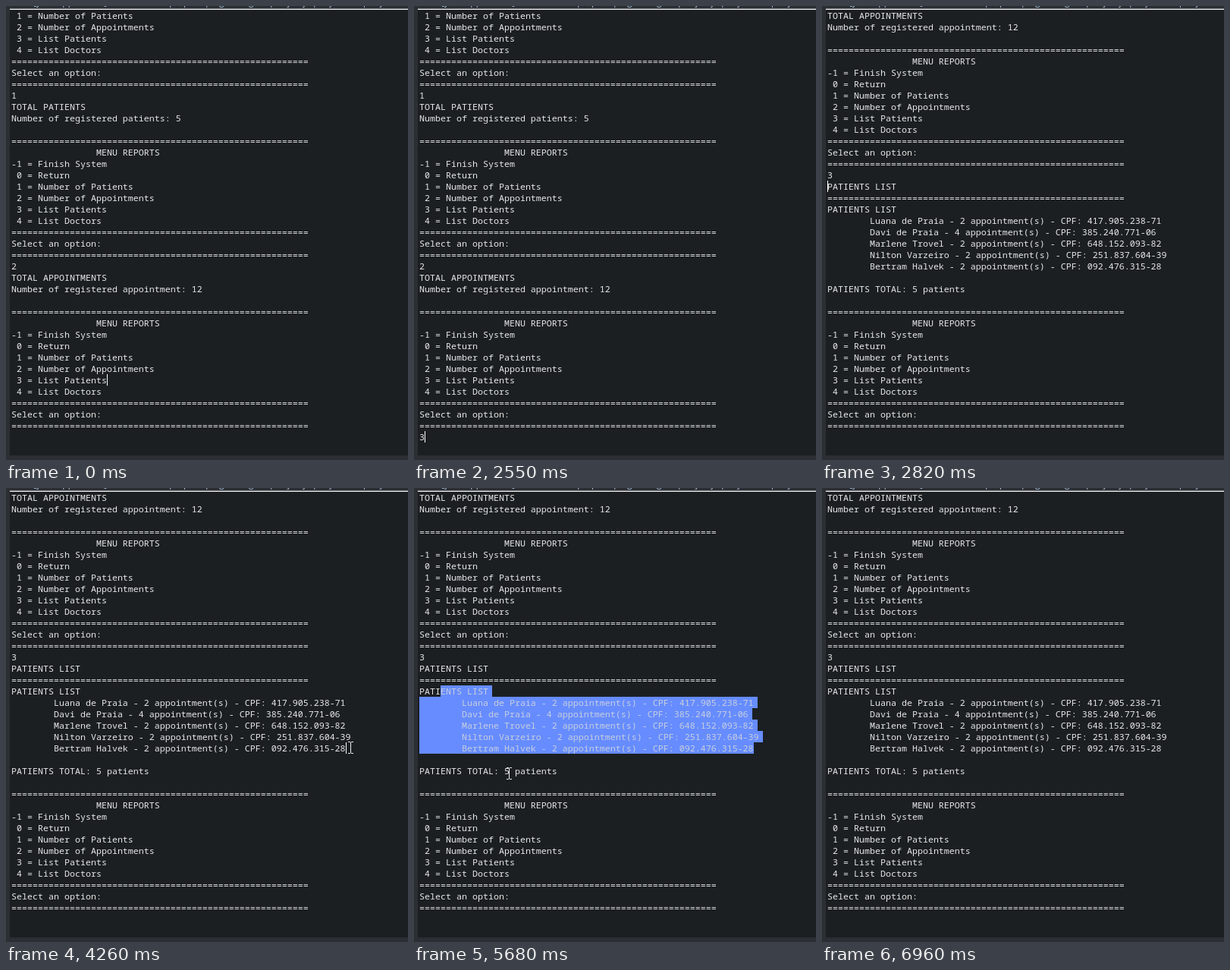
Recreate the animation shown at these times as an HTML page with a canvas. Size 530x598 px, loop 7.36 s.

```html
<!DOCTYPE html>
<html lang="en">
<head>
<meta charset="utf-8">
<title>Console menu</title>
<style>
  html, body { margin: 0; overflow: hidden; background: #1b1f22; }
  canvas { display: block; }
</style>
</head>
<body>
<canvas id="stage" width="530" height="598"></canvas>
<script>
const ctx = document.getElementById('stage').getContext('2d');
const LOOP = 7360, LEFT = 7, TOP = 5, CHAR = 7, ROW = 15;
const BLINK = 500;                        // caret half period, restarted by each move
const MOUSE_START = 3690, STEP = 141.3;   // the pointer is sampled in even steps

// Console text
const rule = '='.repeat(56);
const options = [' 1 = Number of Patients', ' 2 = Number of Appointments',
  ' 3 = List Patients', ' 4 = List Doctors', rule, 'Select an option:', rule];
const menu = ['', rule, ' '.repeat(16) + 'MENU REPORTS', '-1 = Finish System', ' 0 = Return', ...options];
const patient = (name, count, cpf) => `${' '.repeat(8)}${name} - ${count} appointment(s) - CPF: ${cpf}`;
const lines = [
  ...options, '1', 'TOTAL PATIENTS', 'Number of registered patients: 5',
  ...menu, '2', 'TOTAL APPOINTMENTS', 'Number of registered appointment: 12',
  ...menu, '3', 'PATIENTS LIST', rule, 'PATIENTS LIST',
  patient('Luana de Praia', 2, '417.905.238-71'),
  patient('Davi de Praia', 4, '385.240.771-06'),
  patient('Marlene Trovel', 2, '648.152.093-82'),
  patient('Nilton Varzeiro', 2, '251.837.604-39'),
  patient('Bertram Halvek', 2, '092.476.315-28'),
  '', 'PATIENTS TOTAL: 5 patients', ...menu
];

// Waiting, "3" typed, Enter pressed, answer printed
const stages = [
  { start: 0, count: 37, scroll: 0, row: 32, col: 18 },
  { start: 1510, count: 38, scroll: 0, row: 37, col: 1 },
  { start: 2670, count: 38, scroll: 4, row: 38, col: 0 },
  { start: 2820, count: lines.length, scroll: 345, row: 38, col: 0 }
];

// Key points of the pointer, and the steps between which its button is held
const path = [
  { step: 0, x: 451, y: 352 }, { step: 4, x: 454, y: 334 }, { step: 5, x: 337, y: 280 },
  { step: 7, x: 69, y: 261 }, { step: 9, x: 39, y: 257 }, { step: 11, x: 129, y: 346 },
  { step: 15, x: 124, y: 371 }, { step: 16, x: 197, y: 371 }, { step: 17, x: 176, y: 374 },
  { step: 19, x: 337, y: 389 }, { step: 22, x: 468, y: 582 }
];
const drags = [{ press: 4, release: 9 }, { press: 15, release: 17 }, { press: 19, release: 19 }];

const easeOut = u => 1 - (1 - u) ** 1.6;

function pointerAt(step) {
  const next = path.findIndex(point => point.step >= step);
  if (step < 0 || next < 0) return null;
  const b = path[next], a = path[next - 1] || b;
  const u = a === b ? 1 : easeOut((step - a.step) / (b.step - a.step));
  return { x: Math.round(a.x + (b.x - a.x) * u), y: Math.round(a.y + (b.y - a.y) * u) };
}

function cellAt(step, scroll) {
  const { x, y } = pointerAt(step);
  const row = Math.floor((y + 8 - TOP + scroll) / ROW);
  const col = Math.round((x - LEFT - 2) / CHAR);
  return { row, col: Math.min(col, lines[row].length) };
}

function stateAt(t) {
  const stage = stages.findLast(s => s.start <= t);
  const step = Math.floor((t - MOUSE_START) / STEP);
  const drag = drags.findLast(d => d.press <= step);
  let caret = stage, moved = stage.start, selection = null;
  if (drag) {
    const last = Math.min(step, drag.release);
    const anchor = cellAt(drag.press, stage.scroll);
    caret = cellAt(last, stage.scroll);
    moved = MOUSE_START + last * STEP;
    if (last > drag.press) {
      selection = [anchor, caret].sort((a, b) => a.row - b.row || a.col - b.col);
    }
  }
  const lit = (t - moved) % (2 * BLINK) < BLINK;
  return { ...stage, caret, lit, selection, pointer: pointerAt(step) };
}

function box(color, x, y, w, h) {
  ctx.fillStyle = color;
  ctx.fillRect(x, y, w, h);
}

function write(text, col, y, color = '#e8e8e8') {
  ctx.fillStyle = color;
  ctx.fillText(text, LEFT + col * CHAR, y + 12);
}

function drawLine(text, row, y, selection) {
  write(text, 0, y);
  if (!selection) return;
  const [start, end] = selection;
  if (row < start.row || row > end.row) return;
  const from = row === start.row ? start.col : 0;
  const to = row === end.row ? end.col : text.length;
  const lineBreak = row === end.row ? 0 : 5;
  box('#668cff', LEFT + from * CHAR, y, (to - from) * CHAR + lineBreak, ROW);
  write(text.slice(from, to), from, y, '#c8cfdc');
}

function drawWindow() {
  box('#2b2e33', 0, 0, 530, 598);
  box('#1b1f22', 5, 5, 525, 587);
  ctx.font = '12px "Open Sans", sans-serif';
  ctx.fillStyle = '#a9c4dc';
  ctx.fillText('[Java Application] C:\\Users\\dev\\.p2\\pool\\plugins\\org.eclipse.justj.openjdk.hotspot.jre.full.win32', 36, -1);
  box('#70757a', 5, 3, 525, 1);
  box('#f0f0f0', 5, 4, 525, 1);
}

function drawPointer({ x, y }) {
  const color = '#f0f0f0';
  box(color, x, y + 1, 1, 14);
  for (const end of [y, y + 15]) {
    box(color, x - 3, end, 3, 1);
    box(color, x + 1, end, 3, 1);
  }
}

function draw(t) {
  const { count, scroll, caret, lit, selection, pointer } = stateAt(t);
  const rowY = row => TOP + row * ROW - scroll;
  drawWindow();

  ctx.save();
  ctx.beginPath();
  ctx.rect(5, 5, 525, 587);
  ctx.clip();
  ctx.font = '11.667px "Noto Sans Mono", "DejaVu Sans Mono", monospace';
  lines.slice(0, count).forEach((text, row) => drawLine(text, row, rowY(row), selection));
  if (lit) box(selection ? '#d0a030' : '#ffffff', LEFT + caret.col * CHAR, rowY(caret.row), 1, ROW);
  ctx.restore();

  if (pointer) drawPointer(pointer);
}

function tick() {
  draw(performance.now() % LOOP);
  requestAnimationFrame(tick);
}
tick();
</script>
</body>
</html>
```
